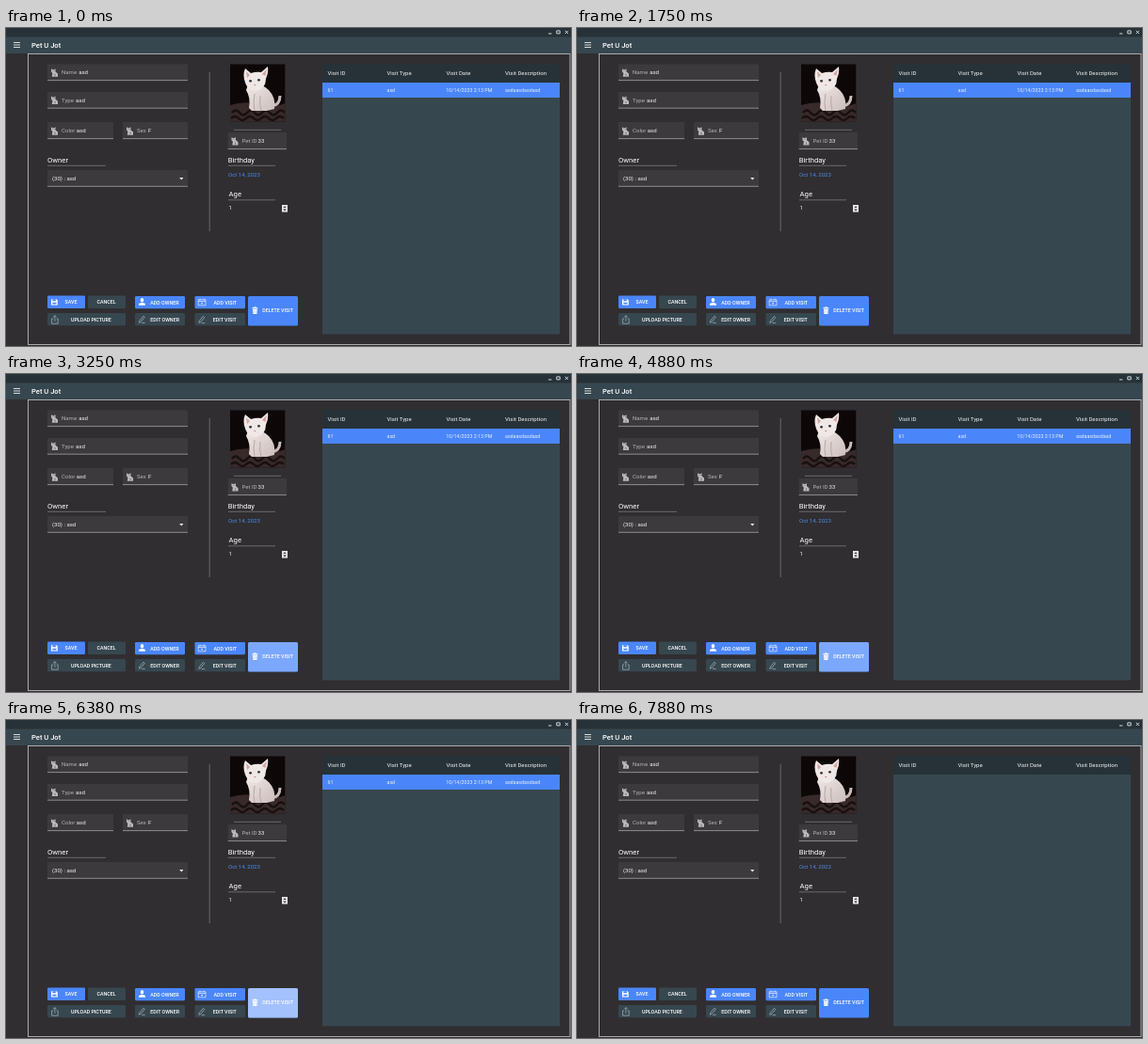
These frames come from a looping animation (600 px wide and 338 px high, 8 s). An HTML page:

```html
<!DOCTYPE html>
<html lang="en">
<head>
<meta charset="utf-8">
<title>Pet record</title>
<style>
html, body { margin: 0; width: 100%; height: 100%; overflow: hidden; background: #302e31; }
svg { display: block; width: 100vw; height: 100vh; }
text { font: 6.05px Roboto, "Open Sans", sans-serif; fill: #f4f4f4; }
.title { font-size: 7.6px; font-weight: 500; fill: #fff; }
.head { font-size: 7.7px; fill: #fff; }
.label { fill: #b4b2b4; }
.date { fill: #4a8dea; }
.btn text { font-size: 5.3px; font-weight: 500; fill: #fff; }
.row text { font-size: 5.3px; fill: #eaf1ff; }
.blue { fill: #4a86fa; }
.slate { fill: #37474f; }
.dark { fill: #263238; }
.field { fill: #3c3a3d; }
.rule { stroke: #a2a0a3; stroke-width: .8; fill: none; }
.icon { fill: none; stroke: #fff; stroke-width: .7; }
.soft { stroke: #aeb9be; }
.row { animation: row 8s step-end infinite; }
.hover { fill: #fff; opacity: 0; animation: hover 8s linear infinite; }
.ripple { fill: #fff; opacity: 0; transform-origin: 285px 300px; animation: ripple 8s linear infinite; }
@keyframes row { 0% { opacity: 1; } 95.375% { opacity: 0; } }
@keyframes hover {
  0%, 26% { opacity: 0; animation-timing-function: ease-out; }
  34%, 80% { opacity: .27; }
  84.375%, 100% { opacity: 0; }
}
@keyframes ripple {
  0%, 76% { opacity: 0; transform: scale(.1); }
  76.2% { opacity: .3; transform: scale(.1); animation-timing-function: ease-out; }
  79.5%, 80.2% { opacity: .3; transform: scale(1); }
  84.375% { opacity: 0; transform: scale(1); }
  100% { opacity: 0; transform: scale(.1); }
}
</style>
</head>
<body>
<svg viewBox="0 0 600 338" preserveAspectRatio="none">
  <defs>
    <symbol id="cat" viewBox="0 0 9 10" overflow="visible">
      <path d="M1 .8 2.5 1.7H4L5.5.8V4L8 6V9.2H1.8L2.4 5.4 1 4Z" fill="#bdbbbd"/>
      <path d="M2.4 3h.7M4 3h.7M5 6v2.5" stroke="#4b494c" stroke-width=".6"/>
    </symbol>
    <symbol id="pen" viewBox="0 0 8 9" overflow="visible">
      <path class="icon soft" d="M.8 7.8 1.4 5.6 5.4.8 6.8 2 2.8 6.9ZM3.6 8H7.2"/>
    </symbol>
    <clipPath id="photo"><rect x="238" y="38.4" width="58.3" height="61.2"/></clipPath>
    <clipPath id="del"><rect x="257" y="285" width="53" height="31.6" rx="1.5"/></clipPath>
    <linearGradient id="fur" x2="1" y2="1"><stop stop-color="#f1e9e7"/><stop offset="1" stop-color="#cbbdbb"/></linearGradient>
  </defs>

  <rect width="600" height="338" fill="#302e31"/>
  <rect class="dark" width="600" height="9.5"/>
  <rect class="slate" y="9.5" width="600" height="17.5"/>
  <path d="M576 6h3.4M584.8 2.9h3.4v3h-3.4ZM593.8 2.8l3.2 3.2m0-3.2-3.2 3.2" fill="none" stroke="#e4e9eb" stroke-width=".9"/>
  <path d="M8 15.5h7M8 18h7M8 20.5h7" stroke="#e8ecee" stroke-width=".9"/>
  <text class="title" x="27" y="20.6">Pet U Jot</text>
  <rect x="23.5" y="27.5" width="575.5" height="309" fill="none" stroke="#b9b8ba" stroke-width=".9"/>

  <g class="field">
    <rect x="44" y="38.5" width="149" height="17.5"/>
    <rect x="44" y="68" width="149" height="17.5"/>
    <rect x="44" y="100" width="70" height="18"/>
    <rect x="124" y="100" width="69" height="18"/>
    <rect x="44" y="151" width="149" height="17.5"/>
    <rect x="235.7" y="111" width="62.3" height="18"/>
  </g>
  <path class="rule" d="M44 55.6H193M44 85.2H193M44 117.6H114M124 117.6H193M44 168.3H193M235.7 128.6H298"/>
  <path class="rule" opacity=".65" d="M44 146.3H106M236 146.3H286M236 182.8H286M242 108.3H292M216.2 47V216"/>
  <use href="#cat" x="47" y="42.5" width="9" height="10"/>
  <use href="#cat" x="47" y="71.8" width="9" height="10"/>
  <use href="#cat" x="47" y="104.5" width="9" height="10"/>
  <use href="#cat" x="127" y="104.5" width="9" height="10"/>
  <use href="#cat" x="238.5" y="115.3" width="9" height="10"/>

  <g class="label">
    <text class="label" x="59" y="49.3">Name</text>
    <text class="label" x="59" y="78.6">Type</text>
    <text class="label" x="59" y="111.3">Color</text>
    <text class="label" x="139" y="111.3">Sex</text>
    <text class="label" x="250.5" y="122.2">Pet ID</text>
  </g>
  <text x="77.2" y="49.3">asd</text>
  <text x="74" y="78.6">asd</text>
  <text x="74.8" y="111.3">asd</text>
  <text x="151" y="111.3">F</text>
  <text x="267.6" y="122.2">33</text>
  <text class="head" x="44" y="142.6">Owner</text>
  <text x="49" y="162">(30) : asd</text>
  <path d="M184.2 159h4.2l-2.1 2.4Z" fill="#f2f2f2"/>
  <text class="head" x="235.7" y="142.6">Birthday</text>
  <text class="date" x="236" y="158">Oct 14, 2023</text>
  <text class="head" x="236.6" y="179.4">Age</text>
  <text x="236.6" y="193.2">1</text>
  <rect x="293" y="188" width="6" height="7.6" fill="#e6e6e6"/>
  <path d="M294.3 191 296 189.2 297.7 191ZM294.3 192.6h3.4L296 194.4Z" fill="#333"/>

  <g clip-path="url(#photo)">
    <rect x="238" y="38" width="59" height="62" fill="#0d0708"/>
    <path d="M238 82Q254 77 270 81T297 80V100H238Z" fill="#38292a"/>
    <path d="M240 90q4-5 8 0t8 0 8 0 8 0 8 0 8 0 8 0M239 96q4-4 8 0t8 0 8 0 8 0 8 0 8 0 8 0" fill="none" stroke="#17100f" stroke-width="2.4"/>
    <path d="M282 83Q291 82 291 72" fill="none" stroke="#c8bab8" stroke-width="3"/>
    <path d="M257 60Q270 57 279 66 287 74 285 86L277 88H261L258 85Q260 74 255 66Z" fill="url(#fur)"/>
    <path d="M254 43 260 48Q266 46 271 47L278 41Q279 48 276 54 276 64 266 67 257 67 254 58 251 50 254 43Z" fill="#f0e8e6"/>
    <path d="M255 46 259 50 256 53ZM277 43.5 272 49 275.5 51Z" fill="#d4a6a5"/>
    <path d="M264 70Q262 80 264 88M270 72Q269 82 271 88" fill="none" stroke="#b6a6a5" stroke-width="1"/>
    <circle cx="259.6" cy="56.3" r="1.4" fill="#34353b"/><circle cx="268.5" cy="55.3" r="1.4" fill="#34353b"/>
    <path d="M263 60h2.5l-1.2 1.5Z" fill="#bd8585"/>
  </g>

  <rect class="slate" x="336" y="38" width="252" height="287.5"/>
  <rect class="dark" x="336" y="38" width="252" height="20"/>
  <text x="341.5" y="50.2">Visit ID</text>
  <text x="404.5" y="50.2">Visit Type</text>
  <text x="467.5" y="50.2">Visit Date</text>
  <text x="530" y="50.2">Visit Description</text>
  <g class="row">
    <rect class="blue" x="336" y="58" width="252" height="16"/>
    <text x="341.5" y="67.8">61</text>
    <text x="404.5" y="67.8">asd</text>
    <text x="467.3" y="67.8">10/14/2023 2:13 PM</text>
    <text x="530" y="67.8">asdaasdasdasd</text>
  </g>

  <g class="btn">
    <rect class="blue" x="44" y="284.5" width="40" height="13.5" rx="1.2"/>
    <rect class="slate" x="87" y="284.5" width="40" height="13.5" rx="1.2"/>
    <rect class="slate" x="44" y="303" width="83" height="13.3" rx="1.2"/>
    <rect class="blue" x="137" y="285" width="53" height="13.2" rx="1.2"/>
    <rect class="slate" x="137" y="303" width="53" height="13.3" rx="1.2"/>
    <rect class="blue" x="200.5" y="285" width="53.5" height="13.2" rx="1.2"/>
    <rect class="slate" x="200.5" y="303" width="53.5" height="13.3" rx="1.2"/>
    <text x="62.6" y="293.2">SAVE</text>
    <text x="96.6" y="293.2">CANCEL</text>
    <text x="69" y="311.5">UPLOAD PICTURE</text>
    <text x="153.3" y="293.5">ADD OWNER</text>
    <text x="153.3" y="311.5">EDIT OWNER</text>
    <text x="220.5" y="293.5">ADD VISIT</text>
    <text x="219.8" y="311.8">EDIT VISIT</text>

    <path d="M48 288.2h5.6l1.2 1.2v5H48Z" fill="#fff"/>
    <path class="blue" d="M49.3 288.2h3.6v2h-3.6ZM49.3 291.7h4.2v1.9h-4.2Z"/>
    <path class="icon soft" d="M50 309h-1.4v5.2h6.6V309h-1.4M51.9 311.8v-6M50.2 307.4l1.7-1.8 1.7 1.8"/>
    <path d="M142.8 288.6a1.7 1.7 0 0 1 3.4 0v1.2a1.7 1.7 0 0 1-3.4 0ZM141 294.7v-1q0-1.6 3.5-1.8 3.5.2 3.5 1.8v1Z" fill="#fff"/>
    <path class="icon" stroke-opacity=".85" d="M204.2 288.8h7.8v6h-7.8ZM204.2 290.5h7.8M206 287.6v1.7M210.2 287.6v1.7M208.1 291.6v2M207.1 292.6h2"/>
    <use href="#pen" x="140.5" y="305.4" width="8" height="9"/>
    <use href="#pen" x="204" y="305.6" width="8" height="9"/>

    <g clip-path="url(#del)">
      <rect class="blue" x="257" y="285" width="53" height="32"/>
      <rect class="hover" x="257" y="285" width="53" height="32"/>
      <path d="M261.3 297.6h6.2M263.4 296.7h2" stroke="#fff" stroke-width=".9"/>
      <path d="M261.9 298.5h5l-.5 5.5h-4Z" fill="#fff"/>
      <path d="M263.4 299.5v3.4M265.4 299.5v3.4" stroke="#8db0fa" stroke-width=".5"/>
      <text x="272.2" y="302.3">DELETE VISIT</text>
      <circle class="ripple" cx="285" cy="300" r="36"/>
    </g>
  </g>
</svg>
</body>
</html>
```
